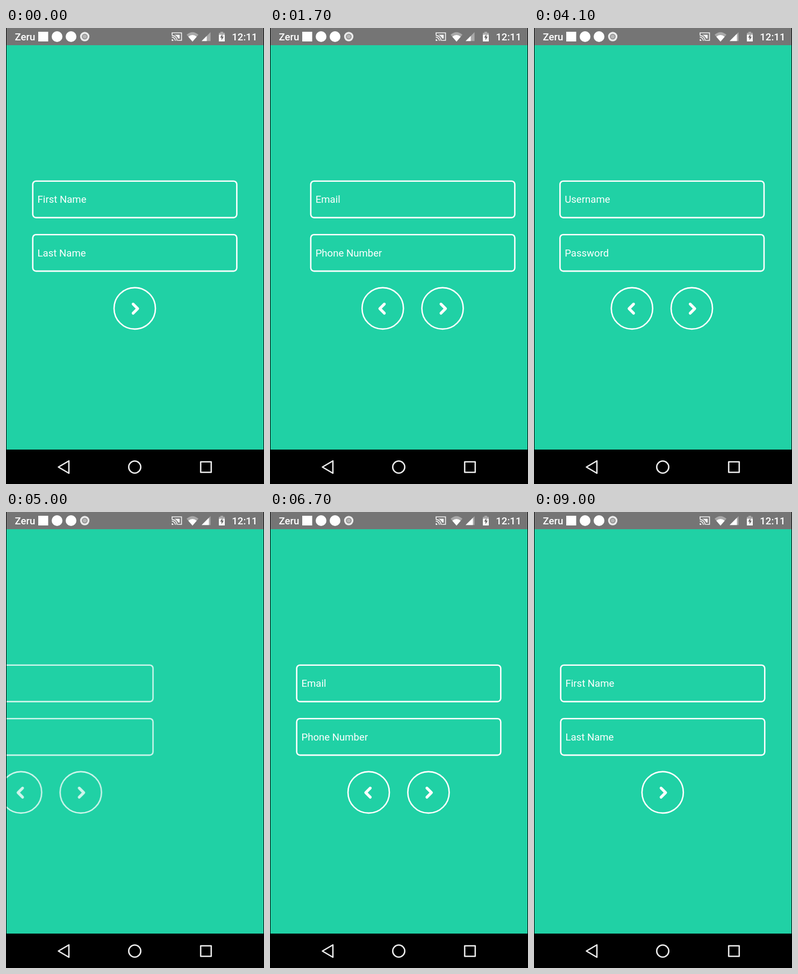
An HTML page that plays this animation: 480x848 px, repeating every 9.5 s.

```html
<!DOCTYPE html>
<html lang="en">
<head>
<meta charset="utf-8">
<title>Sign-up steps</title>
<style>
  html, body { margin: 0; width: 100%; height: 100%; overflow: hidden; background: #000; }
  svg { display: block; width: 100vw; height: 100vh; }
  text { font-family: Roboto, "Noto Sans", sans-serif; font-size: 18.6px; fill: #fff; }
  .status text { font-weight: 500; }
  .page { display: none; }
  .field, .ring { fill: none; stroke: #fff; stroke-width: 2.6px; }
  .chevron { fill: none; stroke: #fff; stroke-width: 5.2px; stroke-linecap: round; stroke-linejoin: round; }
  .nav { fill: none; stroke: #ececec; stroke-width: 2.6px; stroke-linejoin: round; }
  .dim { fill: #a9a9a9; }
</style>
</head>
<body>
<svg viewBox="0 0 480 848" preserveAspectRatio="none">
  <defs>
    <clipPath id="screen"><rect x="1" y="32" width="478" height="752"/></clipPath>
    <g id="fields">
      <rect class="field" x="49.8" y="284.7" width="379.6" height="67.9" rx="6"/>
      <rect class="field" x="49.8" y="384.2" width="379.6" height="67.9" rx="6"/>
    </g>
    <g id="next">
      <circle class="ring" r="38.5"/>
      <path class="chevron" d="M-3-8 5.5.5-3 9"/>
    </g>
    <g id="back">
      <circle class="ring" r="38.5"/>
      <path class="chevron" d="M3-8-5.5.5 3 9"/>
    </g>
    <g id="both">
      <use href="#back" x="183.7" y="521.4"/>
      <use href="#next" x="295" y="521.4"/>
    </g>
  </defs>

  <rect width="480" height="848"/>
  <rect x="1" y="32" width="478" height="752" fill="#20d1a5"/>

  <g clip-path="url(#screen)">
    <g class="page">
      <use href="#fields"/>
      <text x="58.6" y="325">First Name</text>
      <text x="58.6" y="424.6">Last Name</text>
      <use href="#next" x="239.5" y="521.4"/>
    </g>
    <g class="page">
      <use href="#fields"/>
      <text x="58.6" y="325">Email</text>
      <text x="58.6" y="424.6">Phone Number</text>
      <use href="#both"/>
    </g>
    <g class="page">
      <use href="#fields"/>
      <text x="58.6" y="325">Username</text>
      <text x="58.6" y="424.6">Password</text>
      <use href="#both"/>
    </g>
  </g>

  <g class="status" fill="#fff">
    <rect x="1" width="478" height="32" fill="#757575"/>
    <text x="16.5" y="23">Zeru</text>
    <rect x="60" y="7" width="18.5" height="18"/>
    <circle cx="95" cy="16" r="10"/>
    <circle cx="121" cy="16" r="10"/>
    <circle cx="146.5" cy="16" r="8.7" fill="#ececec"/>
    <circle cx="146.5" cy="16" r="4.5" fill="#b5b5b5" stroke="#8c8c8c" stroke-width="1.6"/>

    <!-- cast -->
    <g fill="none" stroke="#f2f2f2" stroke-width="1.7">
      <path d="M309 13V9H326.500V23H319.500M308.500 17.200A6.500 6.500 0 0 1 315 23.700M308.500 13.900A9.800 9.800 0 0 1 318.300 23.700"/>
      <path d="M308.300 23.900v-3.200a3.200 3.200 0 0 1 3.200 3.200z" fill="#f2f2f2" stroke="none"/>
      <path d="M313 12.400H323.200V19.800H320.600Q318 14.500 313 12.400z" fill="#f2f2f2" stroke="none"/>
    </g>

    <!-- wifi -->
    <path class="dim" d="M336 12.500Q347 3 358 12.500L347 25.300z"/>
    <path d="M339.200 16.200Q347 9.800 354.800 16.200L347 25.300z"/>

    <!-- signal -->
    <path class="dim" d="M380.500 7.800V24.200H364z"/>
    <path id="signal"/>

    <!-- battery -->
    <path class="dim" d="M399 7h5v2h3v5h-11v-5h3z"/>
    <path d="M396 12.500h11V25h-11z"/>
    <path d="M402.600 11.500 398.400 17.800h2.500v4.900l4.200-6.500h-2.500z" fill="#666"/>
    <text x="420.300" y="23">12:11</text>
  </g>

  <g class="nav">
    <path d="M117 805V828L97.500 816.500z"/>
    <circle cx="239.500" cy="816.500" r="11.200"/>
    <rect x="362.200" y="806.700" width="19.600" height="19.600"/>
  </g>
</svg>

<script>
const LOOP = 9500, STEP = 100, DURATION = 1000, DP = 478 / 360;

// Keys: progress, shift in dp, opacity
const ENTER = [[0, 600, 0], [.6, -25, 1], [.75, 10, 1], [.9, -5, 1], [1, 0, 1]];
const LEAVE = [[0, 0, 1], [.2, -20, 1], [1, 600, 0]];

// Start time, page, keys, side (1 right, -1 left)
const MOVES = [
  [346, 0, LEAVE, 1], [1339, 1, ENTER, -1],
  [2567, 1, LEAVE, 1], [3560, 2, ENTER, -1],
  [4764, 2, LEAVE, -1], [5757, 1, ENTER, 1],
  [7067, 1, LEAVE, -1], [8060, 0, ENTER, 1]
];

const pages = [...document.querySelectorAll('.page')];
const signal = document.getElementById('signal');
const t0 = performance.now();

// cubic-bezier(.25, .1, .25, 1) across the whole move
function ease(x) {
  if (x <= 0) return 0;
  if (x >= 1) return 1;
  const curve = (s, a, b) => 3 * s * (1 - s) ** 2 * a + 3 * s * s * (1 - s) * b + s ** 3;
  let lo = 0, hi = 1;
  for (let i = 0; i < 24; i++) {
    const mid = (lo + hi) / 2;
    if (curve(mid, .25, .25) < x) lo = mid; else hi = mid;
  }
  return curve(lo, .1, 1);
}

function sample(keys, p) {
  const i = Math.max(1, keys.findIndex(k => k[0] >= p));
  const [a, b] = [keys[i - 1], keys[i]];
  const f = (p - a[0]) / (b[0] - a[0]);
  return [a[1] + (b[1] - a[1]) * f, a[2] + (b[2] - a[2]) * f];
}

function draw(t) {
  const [start, current, keys, side] = MOVES.findLast(m => m[0] <= t) || [0, 0, LEAVE, 0];
  const p = side ? ease((t - start) / DURATION) : 0;
  const [shift, opacity] = sample(keys, p);
  pages.forEach((page, i) => page.style.display = i === current ? 'inline' : 'none');
  pages[current].setAttribute('transform', `translate(${(shift * side * DP).toFixed(2)} 0)`);
  pages[current].setAttribute('opacity', opacity.toFixed(3));

  const reach = t < 2500 ? 373.5 : 377.5;
  signal.setAttribute('d', `M364 24.200H${reach}V${388.200 - reach}z`);
}

function frame() {
  const t = (performance.now() - t0 + 20) % LOOP;
  draw(Math.floor(t / STEP) * STEP);
  requestAnimationFrame(frame);
}
draw(0);
requestAnimationFrame(frame);
</script>
</body>
</html>
```
